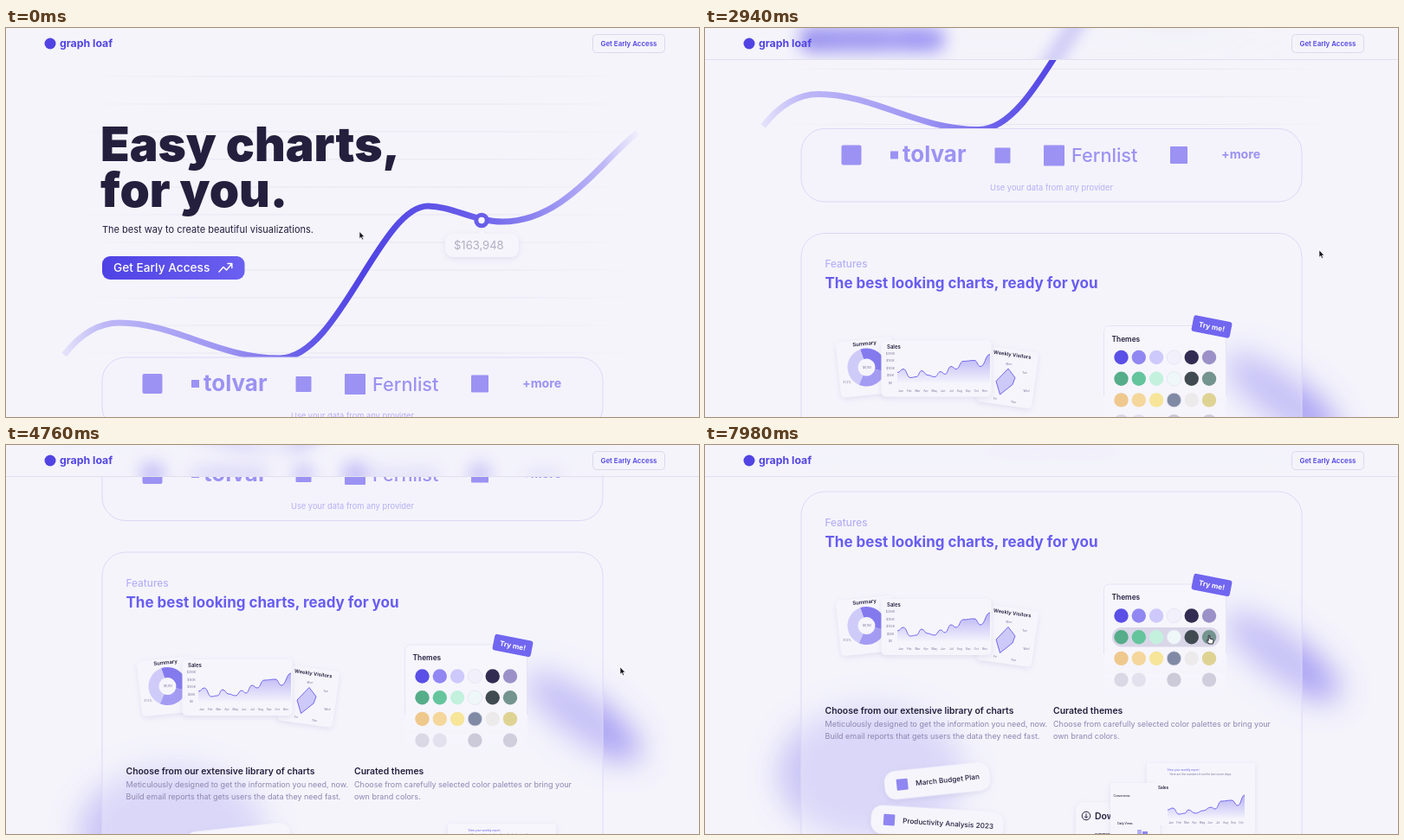
Write an HTML page that moves like this. It is 800 by 450 pixels and loops after 8000 ms.

```html
<!DOCTYPE html>
<html lang="en">
<head>
<meta charset="utf-8">
<title>Easy charts</title>
<style>
  html, body { margin: 0; width: 100%; height: 100%; overflow: hidden; background: #f5f4fb; }
  svg { position: absolute; left: 0; top: 0; font-family: Inter, sans-serif; }
</style>
</head>
<body>
<svg width="800" height="450">
  <defs>
    <linearGradient id="line" gradientUnits="userSpaceOnUse" x1="67" x2="730" y1="0" y2="0">
      <stop offset="0" stop-color="#bdb7f7" stop-opacity=".3"/>
      <stop offset=".07" stop-color="#bdb7f7"/>
      <stop offset=".28" stop-color="#9d95f2"/>
      <stop offset=".42" stop-color="#665be9"/>
      <stop offset=".52" stop-color="#5043e4"/>
      <stop offset=".7" stop-color="#665be9"/>
      <stop offset=".82" stop-color="#8d84f0"/>
      <stop offset=".94" stop-color="#bfb9f7"/>
      <stop offset="1" stop-color="#c9c4f9" stop-opacity=".1"/>
    </linearGradient>
    <linearGradient id="grid" gradientUnits="userSpaceOnUse" x1="80" x2="730" y1="0" y2="0">
      <stop offset="0" stop-color="#dfddeb" stop-opacity="0"/>
      <stop offset=".25" stop-color="#dfddeb" stop-opacity=".6"/>
      <stop offset=".75" stop-color="#dfddeb" stop-opacity=".6"/>
      <stop offset="1" stop-color="#dfddeb" stop-opacity="0"/>
    </linearGradient>
    <linearGradient id="cta"><stop stop-color="#4f42e5"/><stop offset="1" stop-color="#6b60f0"/></linearGradient>
    <linearGradient id="area" x2="0" y2="1">
      <stop stop-color="#8c83f0" stop-opacity=".6"/><stop offset="1" stop-color="#8c83f0" stop-opacity=".02"/>
    </linearGradient>
    <linearGradient id="panel" x2="0" y2="1">
      <stop stop-color="#f7f6fc"/><stop offset=".6" stop-color="#f6f5fc"/><stop offset="1" stop-color="#f5f4fb" stop-opacity="0"/>
    </linearGradient>
    <filter id="soft" x="-60%" y="-60%" width="220%" height="220%"><feGaussianBlur stdDeviation="17"/></filter>
    <filter id="lift" x="-30%" y="-40%" width="160%" height="190%">
      <feDropShadow dx="0" dy="2" stdDeviation="3" flood-color="#8d87b5" flood-opacity=".2"/>
    </filter>
    <filter id="frost" filterUnits="userSpaceOnUse" x="0" y="-30" width="800" height="96" color-interpolation-filters="sRGB">
      <feGaussianBlur stdDeviation="10"/>
    </filter>
    <clipPath id="strip"><rect width="800" height="36"/></clipPath>
  </defs>
  <g id="page"></g>
  <g id="bar">
    <rect width="800" height="36" fill="#f5f4fb"/>
    <g clip-path="url(#strip)"><g filter="url(#frost)"><use href="#page"/></g></g>
    <rect width="800" height="36" fill="#f5f4fb" fill-opacity=".3"/>
    <rect y="36" width="800" height="1" fill="#e1dfee"/>
  </g>
  <g id="top"></g>
</svg>

<script>
const INK = '#241f3d', VIOLET = '#5144e2', MID = '#9b92f3', PALE = '#b6aff6', BG = '#f6f5fc';
const $ = id => document.getElementById(id);

const text = (x, y, size, weight, fill, str, more = '') =>
  `<text x="${x}" y="${y}" font-size="${size}" font-weight="${weight}" fill="${fill}" ${more}>${str}</text>`;
const tiny = (x, y, str, fill = '#8b86a5') => text(x, y, 3.2, 500, fill, str, 'text-anchor="middle"');
const box = (x, y, w, h, r, fill, more = '') =>
  `<rect x="${x}" y="${y}" width="${w}" height="${h}" rx="${r}" fill="${fill}" ${more}/>`;
const dot = (x, y, r, fill, more = '') => `<circle cx="${x}" cy="${y}" r="${r}" fill="${fill}" ${more}/>`;
const turn = (deg, x, y, inner) => `<g transform="translate(${x} ${y}) rotate(${deg})">${inner}</g>`;
const card = (x, y, w, h, r = 5) => box(x, y, w, h, r, BG, 'filter="url(#lift)"');
const EDGE = 'stroke="#dcd8f5"';

// Smooth line through points, with the area under it
function areaChart(points, floor) {
  let d = `M${points[0]}`;
  points.slice(1).forEach(([x, y], i) => {
    const [px, py] = points[i], mx = (px + x) / 2;
    d += `C${mx} ${py} ${mx} ${y} ${x} ${y}`;
  });
  const left = points[0][0], right = points[points.length - 1][0];
  return `<path d="${d}V${floor}H${left}Z" fill="url(#area)"/>
    <path d="${d}" fill="none" stroke="#675ce9" stroke-width=".9"/>`;
}

function hero() {
  let out = '';
  for (let y = 56; y <= 376; y += 32) out += box(80, y - .5, 650, 1, 0, 'url(#grid)');
  out += text(109, 153.5, 55, 900, INK, 'Easy charts,') + text(109, 207, 55, 900, INK, 'for you.');
  out += text(111, 237, 11, 400, INK, 'The best way to create beautiful visualizations.');
  out += box(111, 264, 164.5, 27, 9, 'url(#cta)') + text(124, 282, 13.7, 500, '#fff', 'Get Early Access');
  out += `<path d="M246 282l5-5.5 3.5 3.5 6-7M256 272.6h4.8v4.8" fill="none" stroke="#fff"
    stroke-width="1.5" stroke-linecap="round" stroke-linejoin="round"/>`;
  out += `<path d="M67 378C85 355 105 341 131 341C195 341 245 382 316 382C384 382 432 206 487 206
    C515 206 540 224 573 224C643 224 686 155 729 121" fill="none" stroke="url(#line)" stroke-width="7"/>`;
  out += `<g filter="url(#lift)">${box(507, 238, 85, 27, 9, BG)}<path d="M544 238.5l5-5 5 5z" fill="${BG}"/></g>`;
  out += text(517, 256, 13, 400, '#b1aec0', '$163,948');
  return out + dot(549, 222.5, 6.2, '#f8f7fd', 'stroke="#695ee9" stroke-width="5"');
}

function providers() {
  return box(111, 381, 578, 84.5, 27, '#f4f3fb', EDGE)
    + box(157.5, 400, 23, 23, 2, MID)
    + box(214, 407, 9, 9, 0, MID) + text(228, 419.5, 26, 700, MID, 'tolvar')
    + box(334.5, 403, 18, 18, 1, MID)
    + box(391, 400, 24, 24, 1, MID) + text(423, 419.5, 21.7, 500, MID, 'Fernlist')
    + box(537, 401.5, 20, 20, 1, MID)
    + text(596, 415.5, 14.2, 700, MID, '+more')
    + text(329, 452, 9.3, 400, PALE, 'Use your data from any provider');
}

function donut() {
  const length = 2 * Math.PI * 16, shares = [[0, .34, '#847aee'], [.34, .28, '#a49cf3'], [.62, .38, '#cfcbf9']];
  return shares.map(([from, share, color]) => dot(186.5, 657, 16, 'none',
    `stroke="${color}" stroke-width="12" stroke-dasharray="${share * length} ${length}"
     transform="rotate(${from * 360 - 110} 186.5 657)"`)).join('');
}

function chartCards() {
  let out = turn(-6, 187, 657, card(-33, -32, 66, 64) + text(-14, -25.5, 6, 600, INK, 'Summary'));
  out += donut() + tiny(187, 658, '$8,192') + tiny(164, 675, '31.2%');
  out += turn(8, 350, 670, card(-33, -34, 64, 65) + text(-21, -26, 5.8, 600, INK, 'Weekly Visitors'));
  out += `<path d="M350 658.5L358 669L355 677L340.5 688.5L336 673Z" fill="#b3acf5" fill-opacity=".6" stroke="#675ce9" stroke-width=".9"/>`;
  [['Mon', 351, 654], ['Tue', 369, 664], ['Wed', 371, 685], ['Thu', 356, 698], ['Fri', 335, 694]]
    .forEach(([day, x, y]) => out += tiny(x, y, day));
  out += card(203.5, 626, 127, 65) + text(210, 635, 6, 600, INK, 'Sales');
  ['$200K', '$150K', '$100K', '$50K', '$0'].forEach((s, i) => out += tiny(214, 642 + i * 8.5, s));
  'Jan Feb Mar Apr May Jun Jul Aug Sep Oct Nov'.split(' ').forEach((m, i) => out += tiny(226 + i * 9.7, 685, m));
  return out + areaChart([[222, 663], [229, 659], [237, 669], [244, 668], [250, 661], [257, 666], [265, 668],
    [272, 662], [277, 665], [284, 656], [290, 659], [298, 650], [311, 649], [318, 656], [329, 642]], 675);
}

const rowY = i => 645.5 + i * 24.7;
const palettes = [
  ['#5a4fe6', '#9087f3', '#cdc9fb', '#f2f1fb', '#332c52', '#9b91c8'],
  ['#56ad89', '#64c59d', '#c3f1de', '#eff8f8', '#404b51', '#74948f'],
  ['#efc88e', '#f5d79c', '#f7e59a', '#808aa4', '#eceaea', '#dfd394'],
  ['#dad8e5', '#e2e1ed', 'none', '#cccad8', 'none', '#d0cedd']
];

function themes() {
  let out = box(460.5, 609, 141.5, 130, 7, 'url(#panel)')
    + '<path d="M460.5 690V616q0-7 7-7h127q7 0 7 7v74" fill="none" stroke="#e6e3f3"/>'
    + text(469.5, 627, 8.4, 600, INK, 'Themes')
    + box(470, 659, 124, 22.5, 11, '#d9d6e8', 'id="hover"');
  palettes.forEach((row, i) => row.forEach((color, j) => {
    const edge = i < 3 && j === 3 ? 'stroke="#e3e0f1" stroke-width=".7"' : '';
    out += dot(480.5 + j * 20.3, rowY(i), 8.2, color, edge);
  }));
  return out + turn(11, 585, 610, box(-22.5, -9.5, 45, 19, 3, '#7166f0')
    + text(0, 3, 8.2, 700, '#fff', 'Try me!', 'text-anchor="middle"'));
}

function copy(x, title, ...lines) {
  return text(x, 759.3, 10.4, 600, INK, title)
    + lines.map((line, i) => text(x, 774 + i * 13.8, 9, 400, '#8d86b0', line)).join('');
}

function files() {
  const pill = (deg, y, w, label, iconX, textX) => turn(deg, 268, y, card(-w / 2, -16.5, w, 33, 13)
    + box(iconX, -6.5, 13, 13, 1, '#8f86f1') + text(textX, 3, 8.2, 500, INK, label));
  return pill(-6, 836.5, 122, 'March Budget Plan', -47, -25)
    + pill(3.5, 885, 153, 'Productivity Analysis 2023', -62, -40);
}

function report() {
  const months = 'Jan Feb Mar Apr May Jun Jul Aug Sep Oct'.split(' ');
  let out = card(428, 861, 60, 60, 9)
    + dot(440, 877, 4.8, 'none', `stroke="${INK}" stroke-width="1"`)
    + `<path d="M440 874.3v5M438 877.5l2 2 2-2" fill="none" stroke="${INK}"/>`
    + text(450, 881, 10.5, 600, INK, 'Download') + text(450, 900, 4, 600, INK, 'Summary');
  out += card(510, 816, 125, 90, 2)
    + tiny(552, 824.5, 'View your weekly report', '#7b71ed') + tiny(572, 830, 'Here are the numbers from the last seven days');
  out += card(468, 839, 57, 80, 2) + tiny(481, 855, 'Conversions', INK) + tiny(485, 887, 'Daily Views', INK)
    + box(499, 893, 5, 10, 0, PALE) + box(505, 895, 6, 10, 0, '#8f86f1');
  out += box(519, 836, 113, 52, 2, BG) + text(523, 846, 4.6, 600, INK, 'Sales');
  months.forEach((m, i) => out += tiny(538 + i * 9, 885.5, m));
  return out + areaChart([[534, 870], [540, 868], [547, 875], [554, 874], [558, 870], [566, 874], [575, 871],
    [584, 867], [589, 869], [596, 860], [608, 859], [615, 865], [623, 853]], 880);
}

$('page').innerHTML = hero() + providers()
  + `<g filter="url(#soft)">
      <ellipse cx="192" cy="828" rx="108" ry="78" fill="#8a80f0" opacity=".4"/>
      <ellipse cx="666" cy="692" rx="80" ry="26" fill="#7468ef" opacity=".6" transform="rotate(36 666 692)"/>
    </g>`
  + box(111, 502, 578, 700, 27, '#f5f4fb', 'fill-opacity=".38" ' + EDGE)
  + text(138.5, 541.5, 11.8, 500, PALE, 'Features')
  + text(138.5, 565.5, 17, 700, '#685df0', 'The best looking charts, ready for you')
  + chartCards() + themes()
  + copy(138.5, 'Choose from our extensive library of charts',
    'Meticulously designed to get the information you need, now.',
    'Build email reports that gets users the data they need fast.')
  + copy(402, 'Curated themes', 'Choose from carefully selected color palettes or bring your', 'own brand colors.')
  + files() + report();

$('top').innerHTML = dot(51, 18, 6.5, VIOLET) + text(62, 22.2, 12.3, 700, VIOLET, 'graph loaf')
  + box(677.5, 7.5, 83, 21, 4, 'none', 'stroke="#dbd8ec"') + text(686.5, 20.6, 7.9, 600, VIOLET, 'Get Early Access')
  + `<g id="cursor" stroke-linejoin="round">
      <path id="arrow" d="M0 0V8.2L1.9 6.5L3.2 9.4L4.6 8.8L3.3 6H5.8Z" fill="#16131f" stroke="#fff" stroke-width=".6"/>
      <path id="hand" d="M-.8 .6Q0-.6 .8 .6V4L4 4.8Q5.2 5.2 4.9 6.6L4.3 10H-.2L-3 6.2Q-2.6 5-.8 6.4Z"
        fill="#fff" stroke="#16131f" stroke-width=".9"/>
    </g>`;

const scrollSteps = [[2000, 0], [2100, 38], [2240, 86], [2380, 129.5], [2520, 170], [2660, 206], [2800, 237],
  [2940, 264.5], [3150, 297], [3360, 320], [3640, 342], [3920, 356], [4200, 365.5], [4480, 373], [4760, 378],
  [4970, 378], [5110, 394], [5250, 423], [5460, 442], [5670, 446.5], [5950, 448]];
const pointerSteps = [[0, 408, 235.5], [560, 646, 345], [1000, 646, 345], [1470, 709, 257], [6250, 709, 257],
  [6720, 640, 232], [7070, 560, 199], [7420, 522, 214], [7910, 582, 220]];

const linear = k => k, smooth = k => k * k * (3 - 2 * k);

function at(steps, t, ease) {
  const i = steps.findIndex(s => s[0] > t);
  if (i < 0) return steps[steps.length - 1].slice(1);
  if (i === 0) return steps[0].slice(1);
  const a = steps[i - 1], b = steps[i], k = ease((t - a[0]) / (b[0] - a[0]));
  return a.slice(1).map((v, n) => v + (b[n + 1] - v) * k);
}

const show = (id, on) => $(id).style.display = on ? '' : 'none';

function draw(now) {
  const t = Math.floor(now % 8000 / 70) * 70;
  const [scroll] = at(scrollSteps, t, linear);
  const [x, y] = at(pointerSteps, t, smooth);
  const row = Math.round((y + scroll - rowY(0)) / 24.7);
  const hovering = t > 6300 && x > 470 && x < 594 && row >= 0 && row < 3;

  $('page').setAttribute('transform', `translate(0 ${-scroll})`);
  $('cursor').setAttribute('transform', `translate(${x} ${y})`);
  $('hover').setAttribute('y', rowY(row) - 11.2);
  show('hover', hovering);
  show('hand', hovering);
  show('arrow', !hovering);
  show('bar', scroll > 4);
}

function tick() {
  draw(performance.now());
  requestAnimationFrame(tick);
}
tick();
</script>
</body>
</html>
```
